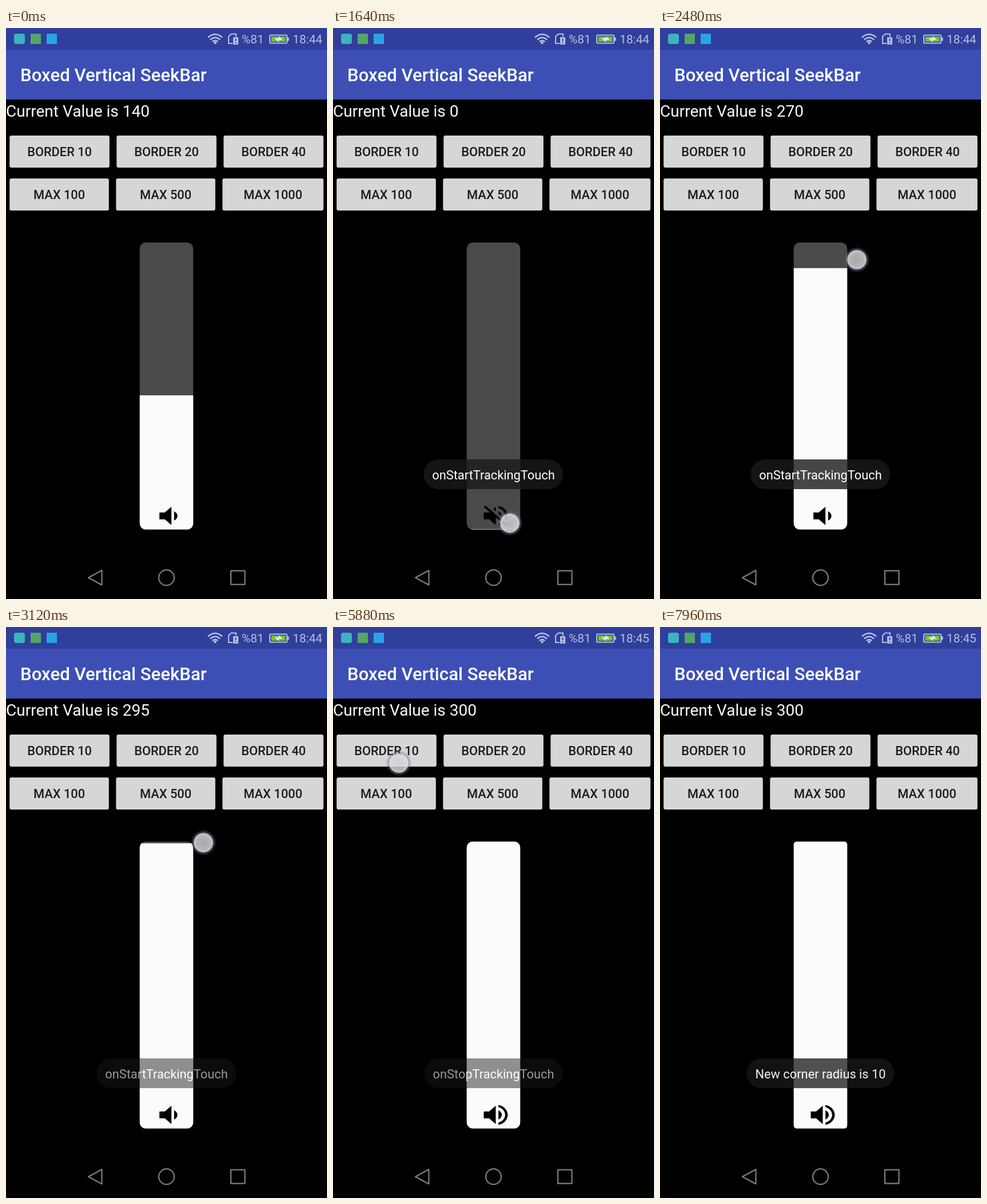
Animation, 561 px wide and 998 px high, one loop 8 s. Source, as an HTML page:

```html
<!DOCTYPE html>
<html lang="en">
<head>
<meta charset="utf-8">
<title>Boxed Vertical SeekBar</title>
<style>
  html, body { margin: 0; width: 100%; height: 100%; overflow: hidden; background: #000; }
  svg { display: block; width: 561px; height: 998px; font-family: Roboto, "Open Sans", sans-serif; }
  .mid { text-anchor: middle; font-size: 21.8px; }
  .button { font-weight: 500; fill: #1c1c1c; }
  .status { font-size: 20.8px; fill: #b9bfe0; }
  .nav { fill: none; stroke: #7e7e7e; stroke-width: 2.2; stroke-linejoin: round; }
</style>
</head>
<body>
<svg viewBox="0 0 561 998">
  <defs>
    <clipPath id="barClip"><rect id="barShape" x="233.7" y="375" width="93.5" height="501.5" rx="10.4"/></clipPath>
    <radialGradient id="glow">
      <stop offset="0" stop-color="#d2d2d2" stop-opacity=".8"/>
      <stop offset=".55" stop-color="#d8d8d8" stop-opacity=".84"/>
      <stop offset=".72" stop-color="#e2e2e6" stop-opacity=".88"/>
      <stop offset=".76" stop-color="#8288a8" stop-opacity=".6"/>
      <stop offset="1" stop-color="#5a6088" stop-opacity="0"/>
    </radialGradient>
  </defs>

  <rect width="561" height="998"/>
  <rect width="561" height="125" fill="#3d4fb5"/>
  <rect width="561" height="38" fill="#2f3f9b"/>

  <rect x="14" y="10" width="19" height="18" rx="4" fill="#3cb3bf"/>
  <rect x="43" y="10" width="18" height="18" fill="#55a566"/>
  <rect x="71" y="10" width="18" height="18" fill="#2aa3e6"/>

  <g fill="none" stroke="#b9bfe0" stroke-width="2.5">
    <path d="M353 16.5Q365.500 5.500 378 16.500M357 20.500Q365.500 13 374 20.500M360.700 24Q365.500 20 370.300 24"/>
    <path d="M402 15V10.500H393.500L389 15V27H396" stroke-width="2"/>
    <rect x="461" y="12.500" width="30" height="14" rx="1.500" stroke-width="2"/>
  </g>
  <circle cx="365.500" cy="26" r="2.300" fill="#b9bfe0"/>
  <rect x="397" y="16" width="9" height="13" rx="1" fill="#b9bfe0"/>
  <path d="M401.500 18.500V23M401.500 25V27" stroke="#2f3f9b" stroke-width="2"/>
  <rect x="492" y="16.500" width="2.500" height="6" fill="#b9bfe0"/>
  <rect x="463.500" y="15" width="25" height="9" fill="#70c531"/>
  <path d="M469 18L477 17.800L476 14L484 20.500L476.500 21L477.500 25Z" fill="#e8edf4"/>
  <text class="status" x="412" y="27">%81</text>
  <text class="status" id="clock" x="501" y="27"></text>

  <text x="25" y="93" font-size="31.170" font-weight="500" fill="#fff">Boxed Vertical SeekBar</text>
  <text id="value" x="0" y="155" font-size="28.050" fill="#fafafa"></text>
  <g id="buttons"></g>

  <g clip-path="url(#barClip)">
    <rect x="233" y="374" width="95" height="504" fill="#4a4a4a"/>
    <rect id="fill" x="233" width="95" fill="#fbfbfd"/>
  </g>
  <path id="icon" transform="translate(256.500 828.700) scale(2.330 2)"/>

  <g class="nav">
    <path d="M144 960.700L167.500 948V973.500Z"/>
    <circle cx="280.500" cy="960.700" r="13.500"/>
    <rect x="393" y="948.700" width="24.500" height="24"/>
  </g>

  <g id="toast">
    <rect id="toastBox" y="754" height="52" rx="26" fill="#1a1a1a" fill-opacity=".8"/>
    <text class="mid" id="toastText" x="280.500" y="788.500" fill="#fff"></text>
  </g>
  <circle id="touch" r="22.500" fill="url(#glow)"/>
</svg>

<script>
const LOOP = 8000, MAX = 300, TOP = 375, BOTTOM = 876, LAG = 45;
const $ = id => document.getElementById(id);
const clamp = v => Math.min(1, Math.max(0, v));

const SPEAKER = 'M3 9v6h4l5 5V4L7 9H3zM16.5 12c0-1.77-1.02-3.29-2.5-4.03v8.05c1.48-.73 2.5-2.25 2.5-4.02z';
const ICONS = {
  low: 'M18.5 12c0-1.77-1.02-3.29-2.5-4.03v8.05c1.48-.73 2.5-2.25 2.5-4.02zM5 9v6h4l5 5V4L9 9H5z',
  full: SPEAKER + 'M14 3.23v2.06c2.89.86 5 3.54 5 6.71s-2.11 5.85-5 6.71v2.06c4.01-.91 7-4.49 7-8.77s-2.99-7.86-7-8.77z',
  mute: 'M16.5 12c0-1.77-1.02-3.29-2.5-4.03v2.21l2.45 2.45c.03-.2.05-.41.05-.63zm2.5 0c0 .94-.2 1.82-.54 2.64l1.51 1.51C20.63 14.91 21 13.5 21 12c0-4.28-2.99-7.86-7-8.77v2.06c2.89.86 5 3.54 5 6.71zM4.27 3L3 4.27 7.73 9H3v6h4l5 5v-6.73l4.25 4.25c-.67.52-1.42.93-2.25 1.18v2.06c1.38-.31 2.63-.95 3.69-1.81L19.73 21 21 19.73l-9-9L4.27 3zM12 4L9.91 6.09 12 8.18V4z'
};

// time, x, y of the dragging finger
const DRAG = [
  [600, 300, 642], [800, 301, 690], [1100, 304, 800], [1400, 307, 880],
  [1560, 308, 884], [1640, 309, 866], [1800, 315, 785], [2050, 329, 620],
  [2300, 340, 472], [2435, 343, 420], [2480, 344, 405], [2650, 345, 388],
  [3120, 345, 377], [3300, 345, 371]
];
const DRAG_END = 3900;
const TAP = { from: 5440, to: 6060, x: 115, y: 238 };

// text, width, fade-in start, fade-out start
const TOASTS = [
  ['onStartTrackingTouch', 244, 1160, 3040],
  ['onStopTrackingTouch', 242, 3980, 5800],
  ['New corner radius is 10', 258, 6100, 7950]
];

function fingerAt(t) {
  const next = DRAG.findIndex(p => p[0] > t);
  if (next === 0) return DRAG[0].slice(1);
  if (next < 0) return DRAG[DRAG.length - 1].slice(1);
  const a = DRAG[next - 1], b = DRAG[next];
  const k = (t - a[0]) / (b[0] - a[0]);
  return [a[1] + (b[1] - a[1]) * k, a[2] + (b[2] - a[2]) * k];
}

function addButton(x, y, width, label) {
  $('buttons').insertAdjacentHTML('beforeend',
    `<rect x="${x}" y="${y}" width="${width}" height="56" rx="3" fill="#d6d6d6"/>
     <text class="mid button" x="${x + width / 2}" y="${y + 36}">${label}</text>`);
}
['10', '20', '40'].forEach((n, i) => addButton(6.3 + i * 187, 188, 174.5, 'BORDER ' + n));
addButton(6.3, 263, 173.5, 'MAX 100');
addButton(192.3, 263, 173.5, 'MAX 500');
addButton(378.3, 263, 176.5, 'MAX 1000');
$('buttons').insertAdjacentHTML('beforeend',
  '<rect id="press" x="6.3" y="188" width="174.5" height="56" rx="3" opacity="0"/>');

function drawBar(t) {
  const y = Math.min(BOTTOM, Math.max(TOP, fingerAt(t - LAG)[1]));
  const level = (BOTTOM - y) / (BOTTOM - TOP) * MAX;
  const value = Math.floor(level / 5 + 1e-6) * 5;
  $('fill').setAttribute('y', y);
  $('fill').setAttribute('height', level > 0 ? 878 - y : 0);
  $('value').textContent = 'Current Value is ' + value;
  $('icon').setAttribute('d', value === 0 ? ICONS.mute : value === MAX ? ICONS.full : ICONS.low);
  $('barShape').setAttribute('rx', t < 6060 ? 10.4 : 5.2);
}

function drawTouch(t) {
  const dragging = t >= DRAG[0][0] && t < DRAG_END;
  const tapping = t >= TAP.from && t < TAP.to;
  const [x, y] = dragging ? fingerAt(t) : [TAP.x, TAP.y];
  $('touch').setAttribute('cx', x);
  $('touch').setAttribute('cy', y);
  $('touch').setAttribute('opacity', dragging || tapping ? 1 : 0);
  $('press').setAttribute('opacity', .1 * clamp((t - 5920) / 140) * clamp((6780 - t) / 500));
}

function drawToast(t) {
  const toast = TOASTS.find(([, , start, end]) => t >= start && t < end + 200);
  $('toast').setAttribute('opacity', toast
    ? clamp((t - toast[2]) / 130) * clamp(1 - (t - toast[3]) / 200) : 0);
  if (!toast) return;
  const [text, width] = toast;
  $('toastBox').setAttribute('x', 280.3 - width / 2);
  $('toastBox').setAttribute('width', width);
  $('toastText').textContent = text;
}

function draw(t) {
  $('clock').textContent = t < 5000 ? '18:44' : '18:45';
  drawBar(t);
  drawTouch(t);
  drawToast(t);
}

const begin = performance.now();
function tick() {
  draw((performance.now() - begin) % LOOP);
  requestAnimationFrame(tick);
}
tick();
</script>
</body>
</html>
```
